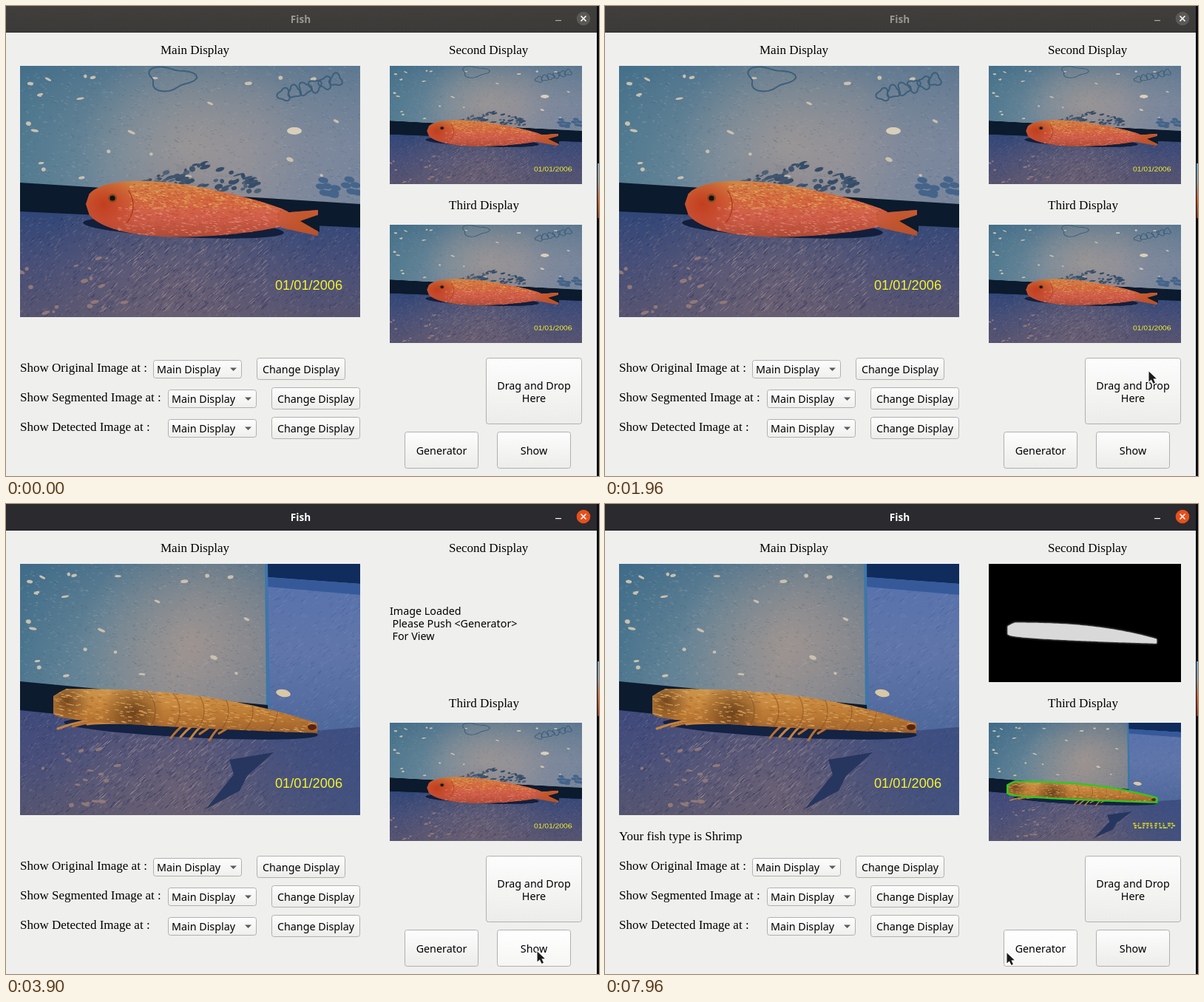
Write an HTML page with a canvas that moves like this. It is 802 by 636 pixels and loops after 8000 ms.

```html
<!DOCTYPE html>
<html lang="en">
<head>
<meta charset="utf-8">
<title>Fish</title>
<style>
html, body { margin: 0; width: 100%; height: 100%; overflow: hidden; background: #efefed; }
canvas { display: block; }
</style>
</head>
<body>
<canvas id="stage" width="802" height="636"></canvas>
<script>
const LOOP = 8000, STEP = 1000 / 15;
const UI = '14.3px "Noto Sans", "Open Sans", sans-serif';
const SERIF = '17px "Liberation Serif", serif';
const MAIN = [19, 81, 460, 340], SECOND = [519, 81, 260, 160], THIRD = [519, 296, 260, 160];
const ctx = document.getElementById('stage').getContext('2d');

let seed = 1;
const rnd = () => (seed = seed * 16807 % 2147483647) / 2147483647;
const between = (a, b) => a + (b - a) * rnd();
const pick = list => list[Math.floor(rnd() * list.length)];

// Photos are painted in stage coordinates of the main display.
function photo(w, h, draw) {
  const cv = document.createElement('canvas'), c = cv.getContext('2d');
  cv.width = w;
  cv.height = h;
  seed = 4711;
  c.scale(w / MAIN[2], h / MAIN[3]);
  c.translate(-MAIN[0], -MAIN[1]);
  draw(c);
  return cv;
}

function poly(c, color, ...points) {
  c.beginPath();
  for (const [x, y] of points) c.lineTo(x, y);
  c.fillStyle = color;
  c.fill();
}

// Closed outline between a top and a bottom curve, both functions of 0..1.
function profile(x0, x1, top, bottom) {
  const path = new Path2D(), n = 60;
  for (let i = 0; i <= n; i++) path.lineTo(x0 + (x1 - x0) * i / n, top(i / n));
  for (let i = n; i >= 0; i--) path.lineTo(x0 + (x1 - x0) * i / n, bottom(i / n));
  path.closePath();
  return path;
}

function grad(c, x0, y0, x1, y1, ...colors) {
  const g = c.createLinearGradient(x0, y0, x1, y1);
  colors.forEach((k, i) => g.addColorStop(i / (colors.length - 1), k));
  return g;
}

function glow(c, x, y, r, rgb, alpha) {
  const g = c.createRadialGradient(x, y, 0, x, y, r);
  g.addColorStop(0, `rgba(${rgb},${alpha})`);
  g.addColorStop(1, `rgba(${rgb},0)`);
  c.fillStyle = g;
  c.fillRect(x - r, y - r, 2 * r, 2 * r);
}

function oval(c, x, y, rx, ry, color, tilt = 0) {
  c.beginPath();
  c.ellipse(x, y, rx, ry, tilt, 0, 7);
  c.fillStyle = color;
  c.fill();
}

function grain(c, n, x, y, w, h, colors, len, slope) {
  c.lineWidth = 1;
  for (let i = 0; i < n; i++) {
    const px = x + w * rnd(), py = y + h * rnd(), l = between(0.4, 1) * len;
    c.strokeStyle = pick(colors);
    c.beginPath();
    c.moveTo(px, py);
    c.lineTo(px + l, py + l * slope);
    c.stroke();
  }
}

function chips(c, n, x, y, w, h, color) {
  for (let i = 0; i < n; i++)
    oval(c, x + w * rnd(), y + h * rnd(), between(2, 6), between(1.2, 3), color, between(-0.5, 0.5));
}

function droplet(c, x, y, rx, ry) {
  c.beginPath();
  for (let a = 0; a < 6.3; a += 0.2) {
    const r = 1 + 0.22 * Math.sin(3 * a + x);
    c.lineTo(x + rx * r * Math.cos(a), y + ry * r * Math.sin(a));
  }
  c.closePath();
  c.strokeStyle = '#3c5f7a';
  c.lineWidth = 2;
  c.stroke();
}

function stamp(c) {
  c.font = '18.2px "Liberation Sans", Arial, sans-serif';
  c.fillStyle = '#f6f22a';
  c.fillText('01/01/2006', 364, 384);
}

function table(c, ...colors) {
  c.fillStyle = grad(c, 0, 275, 0, 421, ...colors);
  c.fillRect(19, 270, 460, 151);
  glow(c, 230, 385, 190, '124,106,116', 0.55);
  grain(c, 2600, 19, 285, 460, 136, ['rgba(150,132,140,.45)', 'rgba(40,46,86,.5)', 'rgba(110,100,124,.45)'], 4, -0.8);
  grain(c, 500, 110, 315, 240, 100, ['rgba(176,154,156,.55)', 'rgba(52,54,92,.6)'], 8, -0.9);
  chips(c, 16, 19, 330, 160, 88, '#8f7878');
}

function backdrop(c, w, ...colors) {
  c.fillStyle = grad(c, 19, 110, 19 + w, 230, ...colors);
  c.fillRect(19, 81, w, 220);
  c.fillStyle = grad(c, 0, 81, 0, 190, 'rgba(62,104,134,.5)', 'rgba(90,120,140,0)');
  c.fillRect(19, 81, w, 110);
  glow(c, 250, 190, 150, '176,157,146', 0.55);
  grain(c, 1500, 19, 81, w, 190, ['rgba(186,184,184,.25)', 'rgba(52,88,114,.25)'], 4, 0.2);
  chips(c, 24, 30, 90, w - 30, 150, '#c9c0b0');
}

function paintFish(c) {
  backdrop(c, 460, '#4a778e', '#72899a', '#878d9a', '#77859c');
  droplet(c, 222, 98, 30, 15);
  for (let i = 0; i < 6; i++) droplet(c, 376 + i * 14, 120 - i * 4, 8, 8);
  for (let i = 0; i < 90; i++) {
    const u = between(-1, 1);
    oval(c, 262 + 80 * u, between(208 + 28 * Math.abs(u), 252), between(2, 8), between(1, 4),
      pick(['#3a526d', '#4a6077', '#8d8d92', '#324a66']), -0.3);
  }
  for (let i = 0; i < 14; i++) oval(c, between(425, 476), between(234, 256), 7, 4, '#45648a', 0.2);
  oval(c, 390, 169, 10, 5, '#d8cfba');

  table(c, '#2f4678', '#474f78', '#575470');
  poly(c, '#0b1a2c', [19, 239], [479, 268], [479, 300], [19, 278]);
  oval(c, 240, 300, 136, 13, '#121f3c', 0.05);

  const mid = u => 268 + 19 * u, half = u => 35 * Math.sin(Math.PI * u ** 0.6) ** 0.7 + 6 * u;
  const body = profile(108, 385, u => mid(u) - half(u), u => mid(u) + half(u));
  const tail = profile(372, 422, u => 280 - 4 * u, u => 300 + 11 * u);
  const paint = grad(c, 0, 238, 0, 311, '#d08544', '#d4683f', '#cf5d48', '#b04c36');
  c.save();
  body.addPath(tail);
  c.clip(body);
  c.fillStyle = paint;
  c.fillRect(100, 230, 330, 90);
  glow(c, 132, 268, 50, '190,56,24', 0.85);
  glow(c, 405, 292, 50, '190,84,36', 0.9);
  grain(c, 650, 165, 240, 190, 34, ['#e0a85c', '#d98a4c', '#c4523a'], 5, 0.2);
  grain(c, 500, 150, 272, 220, 38, ['#e08a7c', '#c04a3c', '#d8705a'], 5, 0.15);
  c.restore();
  poly(c, '#0b1a2c', [398, 291], [424, 282], [424, 306]);
  c.strokeStyle = '#a93c1c';
  c.lineWidth = 1.4;
  c.beginPath();
  c.arc(136, 270, 36, -0.6, 0.7);
  c.stroke();
  oval(c, 144, 260, 6, 6, '#8a4a20');
  oval(c, 144, 260, 3.6, 3.6, '#16110f');
  stamp(c);
}

const prawn = profile(64, 421, u => u < 0.04 ? 260 - 220 * u : 250 + 47 * u ** 2.6, u => 284 + 26 * Math.sqrt(u));

function paintShrimp(c) {
  backdrop(c, 335, '#41708c', '#668496', '#86898f', '#77808c');
  c.fillStyle = grad(c, 0, 100, 0, 300, '#5872ac', '#6076aa', '#50699c');
  c.fillRect(354, 81, 125, 240);
  grain(c, 500, 354, 115, 125, 190, ['rgba(128,142,190,.4)', 'rgba(64,88,146,.4)'], 6, -0.7);
  poly(c, '#0f2c5c', [352, 81], [479, 81], [479, 108], [354, 99]);
  poly(c, '#36599a', [354, 99], [479, 108], [479, 123], [354, 112]);
  poly(c, '#3f76a8', [350, 81], [354, 81], [357, 278], [352, 278]);
  oval(c, 375, 256, 10, 5, '#d9c8a6', 0.2);

  c.save();
  c.beginPath();
  for (const [x, y] of [[19, 276], [354, 312], [479, 302], [479, 421], [19, 421]]) c.lineTo(x, y);
  c.clip();
  table(c, '#3f4a7c', '#484f7a', '#565570');
  c.fillStyle = grad(c, 260, 0, 479, 0, 'rgba(58,80,132,0)', 'rgba(58,80,132,.7)');
  c.fillRect(260, 290, 219, 131);
  c.restore();
  poly(c, '#27365f', [302, 346], [362, 336], [326, 368], [316, 388], [270, 413], [308, 366]);
  poly(c, '#0c1b2e', [19, 240], [354, 272], [356, 314], [19, 279]);
  oval(c, 250, 304, 172, 12, '#142243', 0.05);

  c.lineCap = 'round';
  c.lineWidth = 3;
  for (let i = 0; i < 9; i++) {
    const long = i < 3, x = long ? 172 : 200 + 13 * i;
    c.strokeStyle = pick(['#c78340', '#b8722f']);
    c.beginPath();
    c.moveTo(x, long ? 296 : 300);
    c.quadraticCurveTo(x - (long ? 50 : 8), long ? 284 + 6 * i : 306, x - (long ? 102 - 20 * i : 16), long ? 304 - 3 * i : between(308, 321));
    c.stroke();
  }

  c.save();
  c.clip(prawn);
  c.fillStyle = grad(c, 0, 248, 0, 310, '#cc954c', '#c98a40', '#b87632', '#9c602e');
  c.fillRect(55, 240, 375, 80);
  glow(c, 172, 282, 42, '84,48,20', 0.75);
  glow(c, 82, 266, 32, '80,42,16', 0.7);
  grain(c, 800, 64, 248, 357, 62, ['#d8aa68', '#b8752f', '#a5682e', '#d99c50'], 6, 0.12);
  c.strokeStyle = 'rgba(130,76,30,.5)';
  c.lineWidth = 1.5;
  for (let x = 200; x < 380; x += 33) {
    c.beginPath();
    c.arc(x - 34, 280, 36, -0.9, 0.8);
    c.stroke();
  }
  c.restore();
  poly(c, '#8e8c8c', [194, 247], [208, 247], [200, 257]);
  oval(c, 414, 302, 6, 4, '#5a2412');
}

const fish = photo(460, 340, paintFish);
const plain = photo(460, 340, paintShrimp);
const shrimp = photo(460, 340, c => {
  c.drawImage(plain, ...MAIN);
  stamp(c);
});
const mask = photo(260, 160, c => {
  c.fillRect(...MAIN);
  c.fillStyle = '#d9d9d9';
  c.shadowColor = '#aaa';
  c.shadowBlur = 3;
  c.fill(prawn);
});
const found = photo(260, 160, c => {
  c.drawImage(plain, ...MAIN);
  c.strokeStyle = '#2fc81e';
  c.lineWidth = 5;
  c.lineJoin = 'round';
  c.stroke(prawn);
  c.fillStyle = '#d6d22e';
  for (let x = 364; x < 456; x += 10)
    for (let y = 369; y < 385; y += 6) c.fillRect(x + 4 * rnd(), y, between(2, 8), 4);
});

function text(str, x, y, font = UI, color = '#000', align = 'left') {
  ctx.font = font;
  ctx.fillStyle = color;
  ctx.textAlign = align;
  ctx.fillText(str, x, y);
}

function box(x, y, w, h, paint, border) {
  ctx.beginPath();
  ctx.roundRect(x + 0.5, y + 0.5, w - 1, h - 1, 3);
  ctx.fillStyle = paint;
  ctx.fill();
  ctx.strokeStyle = border;
  ctx.lineWidth = 1;
  ctx.stroke();
}

function button(x, y, w, h, label, mode) {
  const paint = mode === 'down' ? '#dbdbd9'
    : mode === 'hover' ? grad(ctx, 0, y, 0, y + h, '#ffffff', '#f5f6f4')
    : grad(ctx, 0, y, 0, y + h, '#fdfdfd', '#ececea');
  box(x, y, w, h, paint, '#b1b0ae');
  const lines = label.split('\n');
  lines.forEach((s, i) =>
    text(s, x + w / 2, y + h / 2 + 6 + (i - (lines.length - 1) / 2) * 17, UI, '#000', 'center'));
}

function row(kind, i) {
  const x = i ? 219 : 199, y = 480 + 40 * i;
  text(`Show ${kind} Image at :`, 19, y + 15, SERIF);
  box(x, y - 1, 120, 25, grad(ctx, 0, y, 0, y + 25, '#fdfdfd', '#eeeeec'), '#b1b0ae');
  text('Main Display', x + 5, y + 17);
  poly(ctx, '#5c5c5c', [x + 104, y + 9.5], [x + 113, y + 9.5], [x + 108.5, y + 14]);
  button(x + 140, y - 4, 120, 30, 'Change Display');
}

function titleBar(active) {
  ctx.fillStyle = active ? '#2b2a2f' : grad(ctx, 0, 0, 0, 36, '#403f3c', '#3b3a38');
  ctx.fillRect(0, 0, 800, 36);
  ctx.fillStyle = active ? '#1f1e22' : '#2e2d2b';
  ctx.fillRect(0, 35, 800, 1);
  text('Fish', 398.5, 23, 'bold 13.6px "Noto Sans", sans-serif', active ? '#fff' : '#989793', 'center');
  ctx.fillStyle = active ? '#fff' : '#aaa9a6';
  ctx.fillRect(743, 19, 8, 1.2);
  oval(ctx, 781, 17, 9.3, 9.3, active ? '#e5501c' : '#5a5956');
  ctx.strokeStyle = '#fff';
  ctx.lineWidth = 1.6;
  ctx.beginPath();
  for (const d of [-3.5, 3.5]) {
    ctx.moveTo(781 - d, 13.5);
    ctx.lineTo(781 + d, 20.5);
  }
  ctx.stroke();
}

function edge() {
  ctx.fillStyle = '#0b0d14';
  ctx.fillRect(799, 0, 3, 636);
  ctx.fillStyle = grad(ctx, 0, 213, 0, 287, '#6fa3c4', '#8a96a0', '#c25a2c', '#7d3a22');
  ctx.fillRect(800, 213, 2, 74);
}

const ease = (t, t0, t1, pow) => 1 - (1 - Math.min(1, Math.max(0, (t - t0) / (t1 - t0)))) ** pow;

// Pointer moves: start, end, x, y
const MOVES = [[2167, 2367, 721, 521], [2367, 3100, 720, 606], [3833, 3967, 716, 605],
  [4567, 4767, 560, 600], [4900, 5100, 580, 602], [7767, 7967, 543, 607]];

function pointer(t) {
  let x = 735, y = 494;
  for (const [t0, t1, tx, ty] of MOVES) {
    const u = ease(t, t0, t1, 1);
    x += (tx - x) * u;
    y += (ty - y) * u;
  }
  return [Math.round(x), Math.round(y)];
}

function ghost(x, y) {
  ctx.drawImage(shrimp, x - 30, y + 1, 60, 44);
  ctx.fillStyle = 'rgba(20,20,26,.42)';
  ctx.fillRect(x - 30, y + 1, 60, 44);
  ctx.strokeStyle = '#77777a';
  ctx.lineWidth = 2;
  ctx.beginPath();
  ctx.roundRect(x - 30, y + 1, 61, 44, 2);
  ctx.stroke();
  box(x - 38, y + 47, 76, 20, '#e04a16', '#e04a16');
  text('00013.png', x, y + 62, '14px "Noto Sans", sans-serif', '#fff', 'center');

  // Closed hand with a plus badge
  ctx.save();
  ctx.translate(x + 2, y + 15);
  for (const [grow, color] of [[1, '#111'], [0, '#fff']]) {
    oval(ctx, 0, 1, 6.5 + grow, 5.5 + grow, color);
    for (let i = 0; i < 4; i++) oval(ctx, 3 * i - 4.5, -4, 1.7 + grow, 3 + grow, color);
  }
  oval(ctx, 9, 10, 4.6, 4.6, '#1c7ad0');
  ctx.fillStyle = '#fff';
  ctx.fillRect(6.5, 9.4, 5, 1.2);
  ctx.fillRect(8.4, 7.5, 1.2, 5);
  ctx.restore();
}

function arrow(x, y) {
  const p = new Path2D('M.5 .5v14l3.3-2.9 2.8 5.4 2.4-1.2-2.6-5.2 4.4-.4z');
  ctx.save();
  ctx.translate(x, y);
  ctx.strokeStyle = '#fff';
  ctx.lineWidth = 2.2;
  ctx.stroke(p);
  ctx.fillStyle = '#1a1a1a';
  ctx.fill(p);
  ctx.restore();
}

function notice(x, y, name) {
  text('Image Loaded', x, y);
  text(`Please Push <${name}>`, x + 3.5, y + 17);
  text('For View', x + 3.5, y + 34);
}

function render(t) {
  const n = Math.floor((t - 26) / STEP), q = 34 + n * STEP;
  const loaded = t >= 2230, shown = t >= 3700, done = t >= 7160;
  const [px, py] = pointer(q);
  const place = (area, label, down) => {
    const [x, y, w, h] = area;
    const over = loaded && px >= x && px < x + w && py >= y && py < y + h;
    button(...area, label, down ? 'down' : over ? 'hover' : '');
  };

  ctx.fillStyle = '#efefed';
  ctx.fillRect(0, 0, 802, 636);
  titleBar(t >= 3560);
  edge();

  text('Main Display', 209, 65, SERIF);
  text('Second Display', 599, 65, SERIF);
  text('Third Display', 599, 275, SERIF);
  if (!loaded || shown) ctx.drawImage(shown ? shrimp : fish, ...MAIN);
  else notice(19, 240, 'Show');
  if (!loaded || done) ctx.drawImage(done ? mask : fish, ...SECOND);
  else notice(519, 150, 'Generator');
  ctx.drawImage(done ? found : fish, ...THIRD);
  if (done) text('Your fish type is Shrimp', 19, 455, SERIF);

  ['Original', 'Segmented', 'Detected'].forEach(row);
  place([649, 476, 130, 90], 'Drag and Drop\nHere', false);
  place([539, 576, 100, 50], 'Generator', t >= 5700 && !done);
  place([664, 576, 100, 50], 'Show', t >= 3560 && !shown);

  if (n >= 7 && n < 12) {
    const k = n - 7;
    ghost(63 + 160 * k, 400 + 55 * (k - 2) ** 2);
  } else if (t >= 1030 && t < 1960) {
    const u = ease(q, 1033, 1567, 1.4);
    ghost(Math.round(773 - 38 * u), Math.round(626 - 144 * u));
  } else if (t >= 1960) arrow(px, py);
}

const start = performance.now();
function tick() {
  render((performance.now() - start) % LOOP);
  requestAnimationFrame(tick);
}
tick();
</script>
</body>
</html>
```
